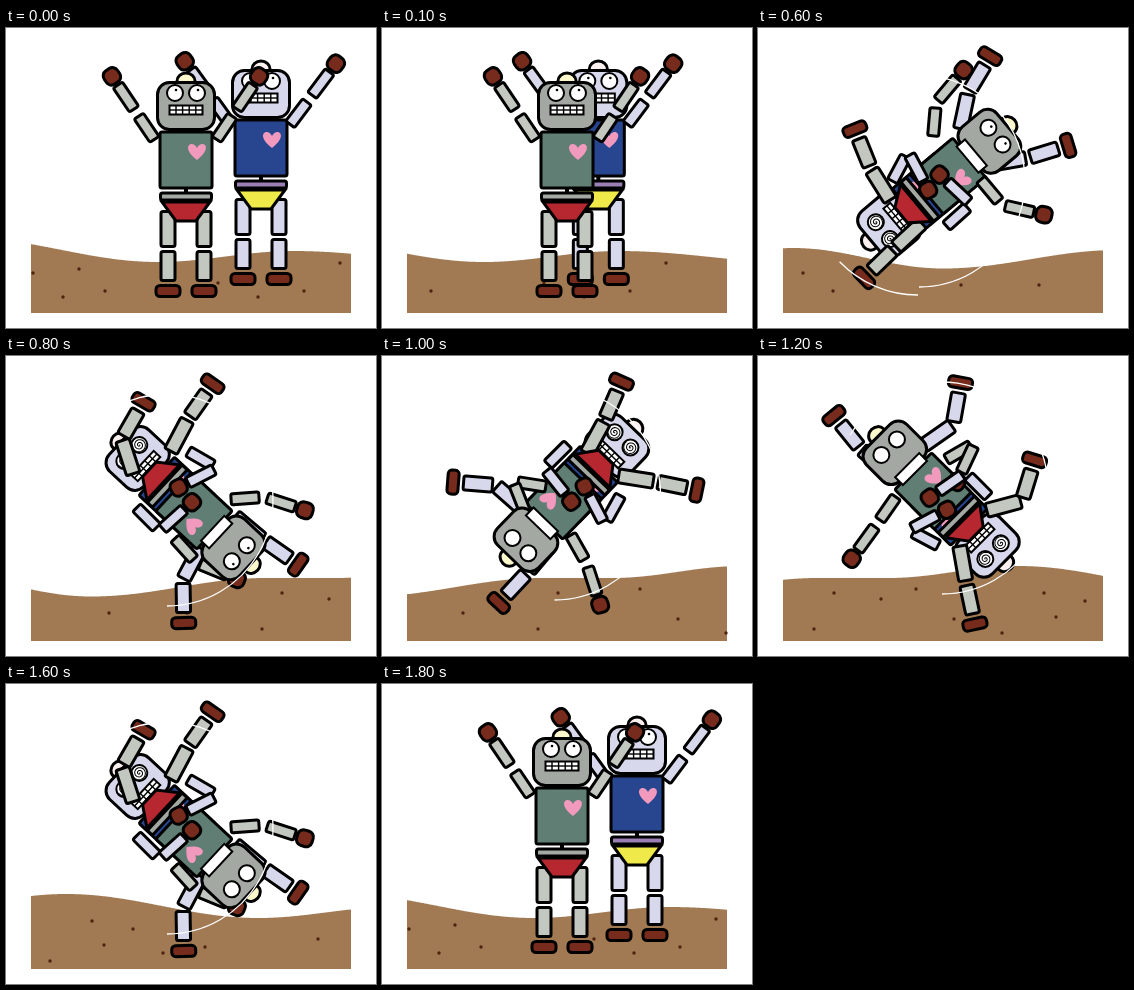
These frames come from a looping animation (370 px wide and 300 px high, 2000 ms). An HTML page with a canvas:

```html
<!DOCTYPE html>
<html lang="en">
<head>
<meta charset="utf-8">
<title>Tumbling robots</title>
<style>
html, body { margin: 0; width: 100%; height: 100%; overflow: hidden; background: #fff; }
canvas { display: block; }
</style>
</head>
<body>
<canvas id="stage" width="370" height="300"></canvas>
<script>
const ctx = document.getElementById('stage').getContext('2d');
const RAD = Math.PI / 180;
const BROWN = '#762b1c';
const GREY = { limb: '#c2c7bf', head: '#a3a9a2', body: '#607e73', bar: '#a3a9a2', hips: '#b72730', dome: '#fdf8cc' };
const BLUE = { limb: '#d8d8ec', head: '#d8d8ec', body: '#27468f', bar: '#9a7fb4', hips: '#f0e94a', dome: '#fbeff0' };

// Robot poses in stage coordinates.
// at: body centre, turn, centre of the motion trail.
// limbs (left arm, right arm, left leg, right leg): joint x, y, upper angle, lower angle.
const STAND = localize({
  at: [180, 132, 0, 0, 0],
  grey: [[130, 84, -124, -124], [229, 84, -56, -56], [162, 220, 90, 90], [198, 220, 90, 90]],
  blue: [[129, 80, -126, -126], [229, 82, -53, -53], [162, 220, 90, 90], [198, 220, 90, 90]]
});
const TUMBLE = [
  { at: [190, 148, 50, 161, 153],
    grey: [[178, 75, -85, -50], [244, 177, 50, 13], [113, 141, -122, -112], [137, 220, 137, 136]],
    blue: [[150, 124, -62, 62], [213, 176, -42, 223], [210, 65, -78, -59], [269, 130, -10, -17]] },
  { at: [188, 155, 133, 161, 144],
    grey: [[258, 141, -4, 18], [191, 207, 48, 22], [182, 63, -62, -55], [116, 83, -108, -60]],
    blue: [[211, 112, 30, 153], [154, 175, 45, -42], [257, 184, 40, 35], [177, 224, 118, 89]] },
  { at: [175, 135, 315, 184, 132],
    grey: [[119, 168, 125, 126], [217, 87, -30, 115], [208, 226, 80, 78], [264, 145, -15, -73]],
    blue: [[151, 174, 208, -28], [207, 117, 225, 145], [103, 93, -140, -129], [195, 69, -35, -80]] }
].map(localize);

const HILLS = [[-60, 230], [35, 220], [185, 240.5], [360, 222], [430, 222], [560, 210], [752, 234], [887, 223], [1070, 235]];
const STONES = [[13, 267], [45, 245], [75, 263], [109, 255], [203, 257], [281, 257], [356, 273], [376, 237],
  [423, 243], [458, 233], [496, 263], [544, 277], [586, 237], [598, 261], [627, 245], [657, 269], [673, 241],
  [699, 263], [812, 255], [852, 269], [898, 263], [934, 235]];

function localize(pose) {
  const [cx, cy, turn] = pose.at;
  const c = Math.cos(turn * RAD), s = Math.sin(turn * RAD);
  const limb = ([x, y, a, b]) =>
    [(x - cx) * c + (y - cy) * s, (y - cy) * c - (x - cx) * s, a - turn, b - turn];
  return { at: pose.at, grey: pose.grey.map(limb), blue: pose.blue.map(limb) };
}

const lerp = (a, b, k) => a + (b - a) * k;
const swing = (a, b, k) => a + ((((b - a + 200) % 360) + 360) % 360 - 200) * k;

function blend(p, q, k) {
  const mix = (m, i) => m.map((v, j) => (j < 2 ? lerp : swing)(v, i[j], k));
  return {
    at: p.at.map((v, j) => lerp(v, j === 2 && q.at[2] < v ? q.at[2] + 360 : q.at[j], k)),
    grey: p.grey.map((m, i) => mix(m, q.grey[i])),
    blue: p.blue.map((m, i) => mix(m, q.blue[i]))
  };
}

function placed(x, y, turn, draw) {
  ctx.save();
  ctx.translate(x, y);
  ctx.rotate(turn * RAD);
  draw();
  ctx.restore();
}

function paint(fill, width = 3) {
  ctx.fillStyle = fill;
  ctx.fill();
  ctx.lineWidth = width;
  ctx.strokeStyle = '#000';
  if (width) ctx.stroke();
}

function box(x, y, w, h, r, fill, turn = 0, line = 3) {
  placed(x, y, turn, () => {
    ctx.beginPath();
    ctx.roundRect(-w / 2, -h / 2, w, h, r);
    paint(fill, line);
  });
}

function oval(x, y, rx, ry, fill, line = 2, turn = 0) {
  ctx.beginPath();
  ctx.ellipse(x, y, rx, ry, turn * RAD, 0, 7);
  paint(fill, line);
}

function shape(points, fill) {
  ctx.beginPath();
  points.forEach(p => ctx.lineTo(...p));
  ctx.closePath();
  paint(fill);
}

function limb([x, y, a, b], fill, leg) {
  const part = (d, angle, w, h, r, color) =>
    box(x + d * Math.cos(angle * RAD), y + d * Math.sin(angle * RAD), w, h, r, color, angle);
  part(-19, a, leg ? 35 : 28, leg ? 14 : 11, 2, fill);
  part(18, b, 29, leg ? 14 : 11, 2, fill);
  part(43, b, leg ? 11 : 16, leg ? 24 : 16, leg ? 4 : 6, BROWN);
}

function heart(x, y) {
  ctx.beginPath();
  ctx.moveTo(x, y + 8);
  ctx.bezierCurveTo(x - 18, y - 6, x - 4, y - 13, x, y - 4);
  ctx.bezierCurveTo(x + 4, y - 13, x + 18, y - 6, x, y + 8);
  paint('#f19abd', 0);
}

function spiral(x, y) {
  ctx.beginPath();
  for (let a = 0; a < 16; a += 0.3) ctx.lineTo(x + a * 0.45 * Math.cos(a), y + a * 0.45 * Math.sin(a));
  ctx.lineWidth = 1;
  ctx.stroke();
}

function teeth(y) {
  box(0, y, 33, 9, 0, '#fff', 0, 2);
  ctx.fillStyle = '#000';
  ctx.fillRect(-16, y - 0.7, 32, 1.4);
  for (let x = -10; x < 16; x += 6.6) ctx.fillRect(x - 0.7, y - 4, 1.4, 8);
}

function torso(look) {
  ctx.fillStyle = '#000';
  ctx.fillRect(-2, -31, 4, 64);
  shape([[-24, 42], [24, 42], [10, 61], [-10, 61]], look.hips);
  box(0, 36.5, 51, 7, 2, look.bar);
  box(0, 0, 52, 56, 2, look.body);
  heart(11, -8);
}

function head(look, mood) {
  oval(0, -79, 9, 8, look.dome, 3);
  box(0, -54, 57, 47, 12, look.head);
  const y = mood === 'stand' ? -67 : -62;
  for (const x of [-11, 11]) {
    oval(x, y, 8, 8, '#fff');
    if (mood === 'dizzy') spiral(x, y);
    else if (mood !== 'blank') oval(x + 1, y - 3, 1.3, 1.3, '#000', 0);
  }
  if (mood === 'stand' || mood === 'dizzy') teeth(mood === 'stand' ? -50 : -43);
  else box(0, -31, 34, 11, 0, '#fff', 0, 2);
}

const arms = (limbs, look) => limbs.slice(0, 2).forEach(m => limb(m, look.limb, false));
const legs = (limbs, look) => limbs.slice(2).forEach(m => limb(m, look.limb, true));

function robot(limbs, look, mood) {
  legs(limbs, look);
  torso(look);
  arms(limbs, look);
  head(look, mood);
}

function standing(k) {
  placed(lerp(255, 139, k), 120, 0, () => robot(STAND.blue, BLUE, 'stand'));
  placed(lerp(180, 195, k), 132, 0, () => robot(STAND.grey, GREY, 'stand'));
}

function tumbling(step) {
  const u = step % 8;
  const [from, start, span] = u < 2 ? [0, 0, 2] : u < 6 ? [1, 2, 4] : [2, 6, 2];
  const pose = blend(TUMBLE[from], TUMBLE[(from + 1) % 3], (u - start) / span);
  const [x, y, turn, ax, ay] = pose.at;
  placed(x, y, turn, () => {
    legs(pose.blue, BLUE);
    placed(0, 23, 180, () => {
      torso(BLUE);
      head(BLUE, 'dizzy');
    });
    robot(pose.grey, GREY, step < 12 ? 'open' : 'blank');
    arms(pose.blue, BLUE);
  });
  ctx.strokeStyle = '#fff';
  ctx.lineWidth = 1.3;
  ctx.beginPath();
  ctx.arc(ax, ay, 106, -150 * RAD, 90 * RAD);
  ctx.stroke();
  if (u === 0) {
    ctx.beginPath();
    ctx.arc(ax - 1, ay + 5, 109, 90 * RAD, 136 * RAD);
    ctx.stroke();
  }
}

// The blue robot bends over while the grey one, seen from the side, takes hold.
function hold() {
  const pale = BLUE.limb, grey = GREY.limb;
  box(167, 180, 30, 10, 2, pale, -50);
  box(140, 201, 14, 16, 2, pale);
  box(140, 229, 15, 36, 2, pale);
  box(140, 256, 24, 11, 4, BROWN);
  box(152, 123, 22, 11, 2, pale, -50);
  box(130, 119, 27, 14, 2, pale, 60);
  box(105.5, 95, 34, 15, 2, pale, 31);
  box(82, 81, 12, 23, 4, BROWN, 31);
  box(139.5, 153, 45, 50, 1, BLUE.body);
  box(139, 167, 48, 56, 11, pale, 18);
  oval(139, 168, 9, 12, '#fbeff0', 3, 18);

  box(219, 133, 15, 14, 5, BROWN, 40);
  box(202, 207, 14, 24, 2, grey);
  box(202, 240, 14, 33, 2, grey);
  box(201, 266, 22, 10, 4, BROWN);
  box(193.5, 207, 15, 24, 2, grey);
  box(193.5, 240, 15, 34, 2, grey);
  box(195, 267, 26, 10, 4, BROWN);
  shape([[175, 178], [216, 178], [210, 196], [181, 196]], GREY.hips);
  box(195, 172, 46, 7, 2, GREY.bar);
  box(195, 135, 46, 56, 2, GREY.body);
  box(178, 130, 30, 11, 2, pale, 42);
  box(196, 126, 12, 28, 2, grey);
  box(195, 160, 11, 28, 2, grey);
  box(205, 147, 14, 14, 5, BROWN, 25);
  box(195, 188, 14, 14, 5, BROWN);
  ctx.fillStyle = '#000';
  ctx.fillRect(193, 103, 5, 4);
  oval(196, 56, 11, 9, GREY.dome, 3);
  box(195.5, 80, 57, 46, 12, grey);
  oval(212, 75, 8, 8, '#fff');
  oval(214, 73, 1.4, 1.4, '#000', 0);
}

function hillAt(x) {
  const i = Math.max(1, HILLS.findIndex(h => h[0] >= x));
  const [a, b] = [HILLS[i - 1], HILLS[i]];
  return lerp(a[1], b[1], (1 - Math.cos(Math.PI * (x - a[0]) / (b[0] - a[0]))) / 2);
}

function ground(scroll) {
  ctx.beginPath();
  for (let x = 25; x <= 345; x++) ctx.lineTo(x, hillAt(x + scroll));
  ctx.lineTo(345, 285);
  ctx.lineTo(25, 285);
  paint('#a17953', 0);
  for (const [x, y] of STONES) {
    const sx = x - scroll;
    if (sx > 25 && sx < 345) oval(sx, y, 1.7, 1.7, '#51230f', 0);
  }
}

function frame(now) {
  const step = Math.floor(now % 2000 / 100);
  const still = step === 0 || step > 17;
  const scroll = still ? 600 : step < 3 ? 600 + step * 50 : step < 6 ? -50 : (step - 6) * 50;
  ctx.fillStyle = '#fff';
  ctx.fillRect(0, 0, 370, 300);
  ground(scroll);
  if (still) standing(0);
  else if (step < 3) standing(step / 3);
  else if (step < 5) hold();
  else tumbling(step + 2);
  requestAnimationFrame(() => frame(performance.now()));
}
frame(performance.now());
</script>
</body>
</html>
```
